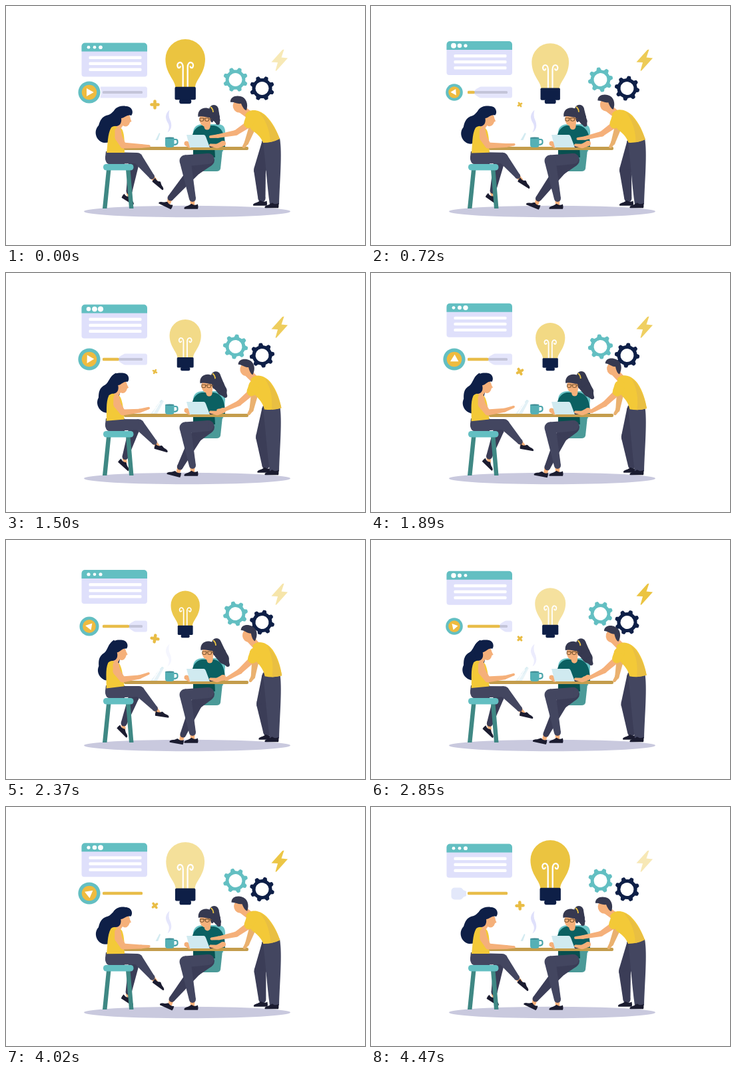
Write an HTML page with a canvas that moves like this. It is 539 px wide and 360 px high and loops after 4500 ms.

```html
<!DOCTYPE html>
<html lang="en">
<head>
<meta charset="utf-8">
<title>Team at work</title>
<style>
html, body { margin: 0; width: 100%; height: 100%; overflow: hidden; background: #fff; }
canvas { display: block; width: 539px; height: 360px; }
</style>
</head>
<body>
<canvas id="stage"></canvas>
<script>
const LOOP = 4500, TAU = Math.PI * 2;
const NAVY = '#0e1f47', TEAL = '#63bfc2', SKIN = '#f5b07a', YELLOW = '#f3c938',
      GOLD = '#ebc440', LILAC = '#dfe0fb', PANTS = '#3b3d57', PANTS_LIGHT = '#434660',
      HAIR = '#363950', SHOE = '#1b1c30', WOOD = '#c49d4c', ICE = '#d0eaf0';

const canvas = document.getElementById('stage');
const g = canvas.getContext('2d');
const dpr = window.devicePixelRatio || 1;
canvas.width = 539 * dpr;
canvas.height = 360 * dpr;

let t = 0;   // time in the loop, ms
let u = 0;   // sway, 0 to 1 and back once per loop
const mix = (a, b) => a + (b - a) * u;
const wave = (turns, shift = 0) => Math.cos(TAU * (turns * t / LOOP - shift));
const clamp = (v, lo, hi) => Math.min(hi, Math.max(lo, v));

// linear track through [time, value] pairs
function track(keys) {
  const i = keys.findIndex(k => k[0] > t);
  if (i < 0) return keys[keys.length - 1][1];
  const [t0, a] = keys[i - 1], [t1, b] = keys[i];
  return a + (b - a) * (t - t0) / (t1 - t0);
}

function fill(color, path) {
  g.fillStyle = color;
  g.fill(new Path2D(path));
}

function stroke(color, width, path) {
  g.strokeStyle = color;
  g.lineWidth = width;
  g.stroke(new Path2D(path));
}

function oval(color, x, y, rx, ry = rx, rot = 0) {
  g.fillStyle = color;
  g.beginPath();
  g.ellipse(x, y, rx, ry, rot, 0, TAU);
  g.fill();
}

function box(color, x, y, w, h, r = 0) {
  g.fillStyle = color;
  g.beginPath();
  g.roundRect(x, y, w, h, r);
  g.fill();
}

// tapered limb through joints [x, y, radius]
function limb(color, ...joints) {
  joints.forEach(([x, y, r], i) => {
    oval(color, x, y, r);
    if (!i) return;
    const [px, py, pr] = joints[i - 1];
    const a = Math.atan2(y - py, x - px) + Math.PI / 2;
    const c = Math.cos(a), s = Math.sin(a);
    g.beginPath();
    g.moveTo(px + c * pr, py + s * pr);
    g.lineTo(x + c * r, y + s * r);
    g.lineTo(x - c * r, y - s * r);
    g.lineTo(px - c * pr, py - s * pr);
    g.fill();
  });
}

// draw around a pivot, rotated in degrees and scaled
function at(x, y, deg, scale, draw) {
  g.save();
  g.translate(x, y);
  g.rotate(deg * Math.PI / 180);
  g.scale(scale, scale);
  draw();
  g.restore();
}

function faded(alpha, draw) {
  g.save();
  g.globalAlpha = alpha;
  draw();
  g.restore();
}

function shoe(x, y, deg, dir = -1) {
  at(x, y, deg, 1, () => {
    g.scale(-dir, 1);
    fill(SHOE, 'M10 -3.5 Q11 1 10 3.7 H-10 C-12 1.5 -8 -0.5 -5 -1 C-2 -2 -1 -4 1 -4 C4 -1.5 7 -2 10 -3.5 Z');
  });
}

function browser() {
  g.save();
  g.translate(113.5, mix(55.5, 45));
  box(LILAC, 0, 3, 98.5, 48, 4);
  box(TEAL, 0, 0, 98.5, 13, [5, 5, 0, 0]);
  for (let i = 0; i < 3; i++) {
    oval('#fff', 10.5 + 9 * i, 6.7, 3.2 + 0.9 * wave(2, 0.42 + 0.13 * i));
    box('#fff', 11, 20 + 9 * i, 79, 4.4, 1.5);
  }
  g.restore();
}

function player() {
  const y = 130, end = 145 + clamp(60 * (t - 130) / 3370, 0, 60);
  if (t < 3500) {
    const left = end <= 145 ? 143 : end;
    const shoulder = Math.min(left + Math.min(end - 145, 10), 208);
    fill('#e4e5fb', `M${left} 127 Q${shoulder - 3} 121.5 ${shoulder} 121.5 L209 121.5
      Q212 121.5 212 125 V135 Q212 138.5 209 138.5 L${shoulder} 138.5
      Q${shoulder - 3} 138.5 ${left} 133 Z`);
    box('#c4c5d9', 145, y - 1.9, 60, 3.8, 1.5);
  }
  if (end > 145) box('#e8bd49', 145, y - 2.3, end - 145, 4.6, 1.5);
  if (t > 4260) {
    box('#e3e8fa', 120.5, 121.5, 18, 18, 5);
    fill('#e3e8fa', 'M134 122 Q139 126 143 127 V134 Q139 135 134 139 Z');
    return;
  }
  const r = clamp(14.7 + 6 * wave(2, 0.8), 12.8, 16.6);
  oval(TEAL, 125, y, r);
  oval('#efbb3f', 125, y, r * 0.68);
  at(125, y, 360 * t / LOOP, r / 16.5, () => fill('#fff', 'M6.8 0 L-4 6 V-6 Z'));
}

function bulb() {
  at(269.2, 147.3, 0, mix(1, 0.726), () => {
    faded(0.75 + 0.25 * wave(4), () =>
      fill(GOLD, `M-15 -25 C-15 -36 -29.8 -45 -29.8 -67.5 A29.8 29.8 0 0 1 29.8 -67.5
        C29.8 -45 15 -36 15 -25 Z`));
    g.lineCap = 'round';
    stroke('#fff', 2.3, 'M-3.5 -26 V-55 C-3.5 -66 -14 -63 -11.5 -56 C-10.5 -53 -8 -54 -7.5 -56');
    stroke('#fff', 2.3, 'M3.5 -26 V-55 C3.5 -66 14 -63 11.5 -56 C10.5 -53 8 -54 7.5 -56');
    box(NAVY, -15.7, -25.5, 31.4, 19.5, 2);
    box(NAVY, -9, -7, 18, 7, 3);
  });
}

function gear(color, x, y, ring, dir) {
  at(x, y, 22.5 + dir * 360 * t / LOOP, 1, () => {
    g.strokeStyle = color;
    g.lineWidth = ring;
    g.beginPath();
    g.arc(0, 0, 10 + ring / 2, 0, TAU);
    g.stroke();
    for (let i = 0; i < 8; i++) {
      g.rotate(TAU / 8);
      fill(color, 'M12 -4.5 L17 -2.8 Q18.6 -2.5 18.6 -1 V1 Q18.6 2.5 17 2.8 L12 4.5 Z');
    }
  });
}

function sparks() {
  faded(0.69 - 0.31 * wave(4), () =>
    fill(GOLD, 'M415 66 L398.5 84.5 L408 85 L404.5 97.5 L406 97.5 L423 78.5 L413.5 77.5 L417.5 65.5 Z'));
  at(223.5, 148.5, 360 * t / LOOP, (10 + 4 * wave(2)) / 14, () => {
    g.lineCap = 'round';
    stroke('#e9bd45', 4.6, 'M-5 0 H5 M0 -5 V5');
  });
  const steam = track([[0, 1], [800, 1], [1050, 0], [1900, 0], [2850, 0.6], [3570, 0.6], [4470, 1], [4500, 1]]);
  faded(steam, () =>
    fill(LILAC, `M245.5 156.5 C237 164 240 171 243.5 177 C246 182 244.5 186 242.5 190.5
      C249 186 249.5 179 246.5 172 C244 167 244 162 245.5 156.5 Z`));
}

function stool() {
  fill('#3f8884', 'M151 246 H157.5 L151.5 305 H145 Z M180 246 H186.5 L191.5 305 H185 Z');
  box(TEAL, 146, 238, 45.5, 9.5, 4.5);
}

function leftLegs() {
  const fx = mix(184, 176), fy = mix(282, 279);
  limb(SKIN, [fx, fy, 3], [fx + 1, fy + 5, 2.5]);
  limb(PANTS, [192, 236, 8], [fx + 1, fy - 3, 4.5]);
  shoe(fx, fy + 9, mix(32, 45), 1);
}

function leftWoman() {
  const ax = mix(221, 226), ay = mix(259, 256);
  stool();
  limb(SKIN, [ax - 2, ay - 2, 3.5], [ax + 3, ay + 4, 3]);
  limb(PANTS_LIGHT, [158, 229, 9], [mix(197, 200), mix(229, 228), 8], [ax - 2, ay - 2, 4]);
  shoe(ax + 8.5, mix(268, 262.5), mix(40, 8), 1);
  fill(PANTS_LIGHT, 'M150 219 H178 V238 H155 Q147 238 150 219 Z');

  at(172, 225, -6.5 * u, 1, () => {
    g.translate(-172, -225);
    // long hair, trailing the head a little
    at(168, 165, -14 * u, 1, () =>
      fill(NAVY, `M6 -14 C-4 -12 -8 -3 -14 -1 C-25 1 -27 9 -29 15 C-38 24 -32 40 -20 41
        C-8 41 -3 34 -4 27 C4 19 9 9 10 0 Z`));
    fill(YELLOW, 'M158 183 C163 179 171 180 175 187 C178 195 178 206 178 221 H151 C153 209 152 193 158 183 Z');
    fill(SKIN, 'M167 169 L178 177 L172 185 Q165 184 165 180 Z');
    oval(SKIN, 179.5, 171, 7.3, 10.5);
    fill(SKIN, 'M186 168 L188.5 174 L186 175 Z');
    fill(NAVY, `M161 166 C159 154 171 149 180 151 C190 151 192 161 188 165
      C181 163 178 169 173 169 C174 176 171 181 165 181 C160 177 161 171 161 166 Z`);
  });
}

function leftArm() {
  const sx = mix(168, 165);
  limb(SKIN, [sx, 188, 4.5], [sx + 1, 198, 5.5], [mix(176, 175), 210, 4.5],
    [mix(203, 200), mix(211, 206.5), 3], [mix(215, 214), mix(211, 201), 1.8]);
}

function chair() {
  fill('#6cc3c6', 'M281 190 Q282 178 296 178 H318 Q330 178 329 192 L326 219 H283 Z');
  fill('#4b9a98', 'M284 217 H325 L322 245 Q321 249 316 249 H285 Z');
}

function midLegs() {
  const ax = mix(246, 265), ay = mix(291, 295);
  limb(SKIN, [ax, ay, 3.3], [ax - 1.5, ay + 5, 3]);
  limb(PANTS, [303, 232, 10], [mix(284, 286), 246, 9], [ax + 1, ay - 2, 4.5]);
  shoe(mix(240, 256.5), mix(298.5, 303), mix(26, 10), -1);
  limb(SKIN, [280, 294, 3.3], [280, 300, 3]);
  limb(PANTS_LIGHT, [304, 230, 8], [269, 233, 8.5], [280, 290, 5]);
  shoe(278, 302, 0, -1);
}

function midWoman() {
  chair();
  fill('#08504f', 'M281 210 H313 L314 228 H281 Z');
  midLegs();
  fill('#0b6062', 'M279 212 C277 195 282 182 294 180 H312 C325 182 329 195 329 212 Z');
  fill('#08504f', 'M285 212 L288 193 L291 212 Z');
  g.save();
  g.translate(4 * u, -u);
  limb(HAIR, [312, 156, 7], [mix(315, 317), mix(168, 171), mix(6, 9)], [mix(317, 323), mix(172, 180), mix(4.5, 8)], [mix(318, 329), mix(176, 189), 3]);
  limb(SKIN, [302, 175, 5], [302, 182, 4.5]);
  oval(SKIN, 299, 170.5, 8.5, 11);
  fill(HAIR, `M288.5 167 C287 157 295 152 303 154 C313 155 315 164 311 174
    C309 177 307 175 306 168 C300 168 294 165 288.5 167 Z`);
  stroke(GOLD, 1.8, 'M307 152 Q311 155 311 160');
  stroke('#7b5630', 1.1, 'M291 169 h5.5 v3.5 q-3 2 -5.5 0 Z M299 169 h5.5 v3.5 q-3 2 -5.5 0 Z M296.5 170 h2.5 M304.5 170 h4');
  g.restore();
}

function desk() {
  box(WOOD, 177, 212, 187, 5, 2);
  const open = track([[0, 0], [750, 0], [1100, 0.8], [1890, 1], [2850, 0.8], [3300, 0], [4500, 0]]);
  fill('#d3ebf1', `M${mix(230, 234)} 191 L${mix(231.5, 237)} 192 L${mix(228, 230)} 202 H${mix(224.5, 225)} Z`);
  faded(open, () => {
    fill('#e3f1f6', 'M234 192 L237 193 L227 212 H217 Z');
    stroke('#fff', 1.5, 'M231 195 L221 211');
  });
  stroke('#4ba5ab', 2.2, 'M251 201 H255 Q257.5 201 257.5 204 V206 Q257 209 251 209');
  box('#55b0b5', 239, 198, 13.5, 15, [1, 1, 4, 4]);
  oval('#3f8b93', 245.7, 198.6, 6.5, 1.2);

  limb(SKIN, [271, 207, 3.5], [276, 211, 3]);
  box(NAVY, 301, 211, 15, 2, 1);
  fill(ICE, 'M271 194 H297 Q299 194 300 197 L306 213 H276 Z');
  limb(SKIN, [326, 207, 4], [317, 211, 3.2], [307, 209.5, 2]);
}

function manBack() {
  const kx = mix(379, 383), ax = mix(384, 392);
  limb(PANTS, [396, 207, 12], [kx + 2, 247, 9], [ax, 290, 5.5]);
  shoe(mix(381.5, 390), 297, 0, -1);
  fill(PANTS_LIGHT, 'M386 205 L411 199 C415 222 411 262 410 299 H396 C392 270 390 238 386 205 Z');
  shoe(399, 300.5, 0, -1);
  limb('#eab16f', [mix(369, 374), 185, 5], [mix(361, 371), 206, 3.2], [mix(357, 367), 212, 2.2]);
}

function man() {
  manBack();
  g.save();
  g.translate(2.5 * u, 2 * u);
  at(400, 205, 11.5 * u, 1, () => {
    g.translate(-400, -205);
    limb(SKIN, [353, 155, 6], [364, 163, 6]);
    oval(SKIN, 349, 151, 8.2, 9.5, -0.3);
    fill(HAIR, `M337 145 C336 137 345 134 352 136 C361 138 364 148 361 157
      C358 157 355 152 353 147 C347 148 342 144 337 145 Z`);
    fill(YELLOW, `M359 164 C364 155 378 154 390 165 C401 176 407 189 411 200
      Q400 206 386 206 C382 196 376 192 368 186 Z`);
    fill('#e9bf42', 'M380 160 C391 165 405 184 411 200 Q404 203 397 205 C396 190 392 174 380 160 Z');
  });
  g.restore();
  const sx = mix(366, 372), sy = mix(177, 179);
  limb(SKIN, [sx - 3, sy + 2, 5], [mix(345, 351), mix(191, 198), 4], [mix(318, 332), mix(196, 209), 2.8], [mix(307, 322), mix(197, 210), 2]);
  limb(YELLOW, [sx + 2, sy - 9, 8], [sx - 2, sy, 7]);
}

function draw() {
  u = (1 - wave(1)) / 2;
  g.setTransform(dpr, 0, 0, dpr, 0, 0);
  g.clearRect(0, 0, 539, 360);
  oval('#c9c9de', 272, 309.5, 155, 8.7);
  browser();
  player();
  bulb();
  gear(TEAL, 344.5, 111, 4.8, 1);
  gear(NAVY, 384.5, 124, 5, -1);
  sparks();
  leftLegs();
  leftWoman();
  midWoman();
  desk();
  leftArm();
  man();
}

const start = performance.now();
function tick() {
  t = (performance.now() - start) % LOOP;
  draw();
  requestAnimationFrame(tick);
}
tick();
</script>
</body>
</html>
```
